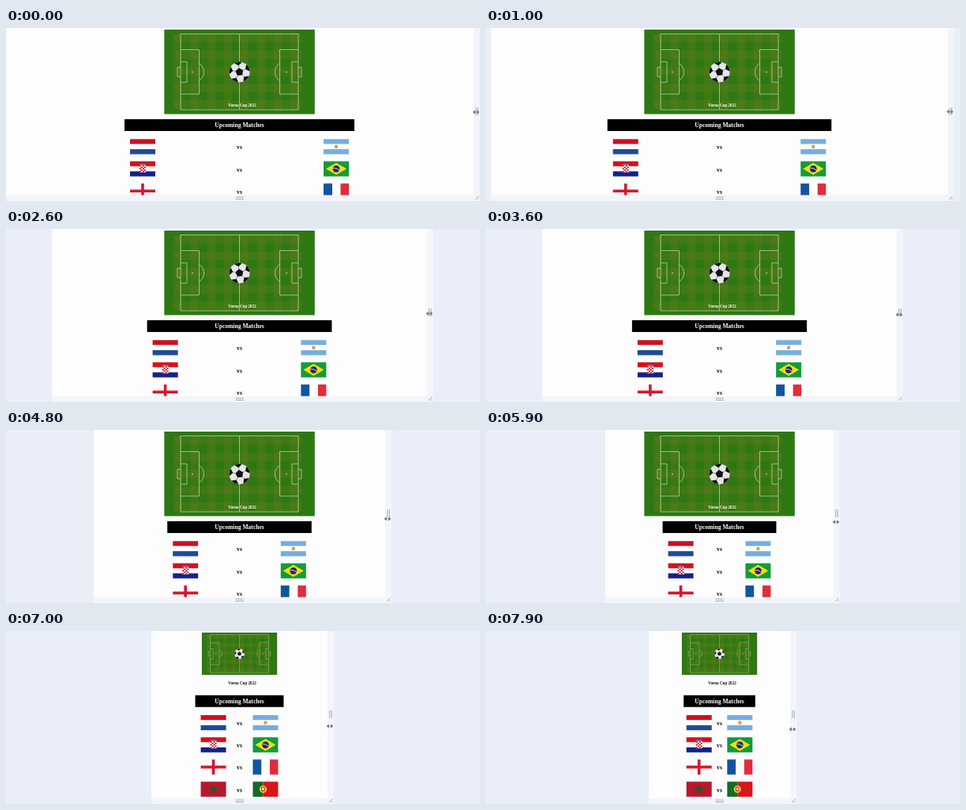
An HTML page that plays this animation: 600x220 px, repeating every 8 s.

```html
<!DOCTYPE html>
<html lang="en">
<head>
<meta charset="utf-8">
<title>Resizing a match page</title>
<style>
html, body { margin: 0; width: 100%; height: 100%; overflow: hidden; background: #e9eef8; }
svg { display: block; }
text { font: bold 7.6px "Liberation Serif", "Times New Roman", serif; text-anchor: middle; }
</style>
</head>
<body>
<svg id="stage" width="600" height="220" viewBox="0 0 600 220"></svg>
<script>
const MID = 295.5, LOOP = 8000, STEP = 100;

// [time, value] points joined by straight lines
const edgeKeys = [[0, -1], [900, 2], [1600, 35], [1800, 35], [2700, 61], [3600, 71], [4500, 98],
  [4800, 111], [5400, 135], [5900, 151], [6300, 159], [7000, 184], [7200, 188], [7900, 206]];
const pointerKeys = [[0, 107], [1600, 106], [3600, 109], [4800, 113], [5900, 117], [7000, 121], [7900, 125]];

function track(keys, t) {
  const i = keys.findIndex(k => k[0] > t);
  if (i < 0) return keys[keys.length - 1][1];
  const [t0, a] = keys[i - 1], [t1, b] = keys[i];
  return a + (b - a) * (t - t0) / (t1 - t0);
}

const rect = (x, y, w, h, fill, more = '') =>
  `<rect x="${x}" y="${y}" width="${w}" height="${h}" fill="${fill}" ${more}/>`;
const circle = (x, y, r, fill) => `<circle cx="${x}" cy="${y}" r="${r}" fill="${fill}"/>`;
const path = (d, fill, more = '') => `<path d="${d}" fill="${fill}" ${more}/>`;
const repeat = (n, f) => Array.from({ length: n }, (_, i) => f(i)).join('');
const bands = (...c) => c.map((f, i) => rect(0, i * 6.4, 32, 6.4, f)).join('');

// Star-like polygon; jump 1 gives a pentagon, jump 2 a star
function penta(x, y, r, jump = 1, turn = 0) {
  const pts = Array.from({ length: 5 }, (_, i) => {
    const a = (i * jump * 72 + turn - 90) * Math.PI / 180;
    return (x + r * Math.cos(a)).toFixed(2) + ' ' + (y + r * Math.sin(a)).toFixed(2);
  });
  return 'M' + pts.join('L') + 'Z';
}

const flags = {
  netherlands: bands('#cc1020', '#fff', '#1f4a96'),
  argentina: bands('#75aede', '#fff', '#75aede') + circle(16, 9.6, 2.3, '#d9a04c'),
  croatia: bands('#d5101c', '#fff', '#14208c') + rect(12, 5, 8, 9, '#fff') +
    repeat(20, i => (i + (i / 4 | 0)) % 2 ? '' :
      rect(12 + i % 4 * 2, 5 + (i / 4 | 0) * 1.8, 2, 1.8, '#d5101c')) +
    rect(12.5, 3.2, 7, 1.8, '#5a83b8'),
  brazil: rect(0, 0, 32, 19.2, '#129b3c') + path('M3 9.6L16 2L29 9.6L16 17.2Z', '#f8dc0c') +
    circle(16, 9.6, 4.4, '#1b2a75') + path('M11.9 8.6Q16.5 8 20 11.4', 'none', 'stroke="#fff" stroke-width=".8"'),
  england: rect(0, 0, 32, 19.2, '#fdfafa') + rect(14.2, 0, 3.6, 19.2, '#d2182e') + rect(0, 7.8, 32, 3.6, '#d2182e'),
  france: rect(0, 0, 11, 19.2, '#1254a0') + rect(11, 0, 10.5, 19.2, '#fff') + rect(21.5, 0, 10.5, 19.2, '#e12c3c'),
  morocco: rect(0, 0, 32, 19.2, '#b8182c') +
    path(penta(16, 10, 5, 2), 'none', 'stroke="#1a5a30" stroke-width="1.2"'),
  portugal: rect(0, 0, 13, 19.2, '#14692c') + rect(13, 0, 19, 19.2, '#d8141c') +
    circle(13, 9.6, 4.6, '#e6cf30') + rect(10.8, 6.6, 4.4, 5.6, '#d8141c') + rect(11.8, 7.6, 2.4, 3.4, '#fff')
};
const matches = [['netherlands', 'argentina'], ['croatia', 'brazil'], ['england', 'france'], ['morocco', 'portugal']];

// The pitch is drawn around its top centre
const halfPitch = path('M-74.5 27.5H-51V84H-74.5M-74.5 43H-66.500V69H-74.5M-74.5 50H-78.5V62H-74.5M-51 45A13 13 0 0 1 -51 67', 'none') +
  circle(-59.5, 56, .5, '#cfe0bc');
const ball = `<g transform="translate(0 56) rotate(-8)">` + circle(0, 0, 13, '#e6e6e6') +
  `<g clip-path="url(#round)">` +
  repeat(5, i => `<g transform="rotate(${i * 72})">` +
    path('M0 -5V-10', 'none', 'stroke="#777" stroke-width=".7"') + path(penta(0, -13, 4.6, 1, 180), '#111') + '</g>') +
  path(penta(0, 0, 5.2), '#111') + '</g></g>';
const pitch = rect(-95.2, 0, 190.5, 107.500, '#2d7813', 'transform="translate(0 2)"') +
  repeat(8, i => rect(-83 + i * 21, 8, 10.5, 96, '#7b7a1c', 'opacity=".22"')) +
  repeat(5, i => rect(-83, 8 + i * 21, 162, 10.5, '#7b7a1c', 'opacity=".22"')) +
  `<g stroke="#b9d3a2" stroke-width=".8">` + rect(-74.5, 7.5, 149, 96.5, 'none') + path('M0 7.5V104', 'none') +
  halfPitch + `<g transform="scale(-1 1)">${halfPitch}</g></g>` + ball;

const grip = (d, x, y) => `<g transform="translate(${x} ${y})">` +
  path(d, 'none', 'stroke="#a4a8ae" stroke-width="1"') + '</g>';

const stage = document.getElementById('stage');
stage.innerHTML = `<defs><clipPath id="round"><circle r="13"/></clipPath>
  <clipPath id="view"><rect width="600" height="212.5"/></clipPath></defs>
  <rect id="frame" height="220" fill="#f3f5fa"/>
  <rect id="page" height="212.5" fill="#fdfdfe"/>
  <g clip-path="url(#view)">
    <g id="pitch">${pitch}</g>
    <text id="title" x="299" style="font-size:5.1px">Vorna Cup 2022</text>
    <g id="list">
      <rect id="bar" y="116" height="15" fill="#000"/>
      <text x="${MID}" y="126" fill="#fff">Upcoming Matches</text>
      ${repeat(4, i => `<text x="${MID}" y="${154.3 + i * 28.2}" fill="#111">vs</text>`)}
      ${[0, 1].map(side => `<g id="side${side}">` + matches.map((m, i) =>
        `<g transform="translate(0 ${141.3 + i * 28.2})">${flags[m[side]]}</g>`).join('') + '</g>').join('')}
    </g>
  </g>
  ${grip('M-5 -1H5.500M-5 1.5H5.5', MID, 216)}
  <g id="grips">${grip('M-1.2 -5V5M1.3 -5V5', 0, 106) + grip('M-2 2.500L2.500 -2M1 2.5L2.5 1', 0, 215.500)}</g>
  <g id="pointer">${path('M-4 0L-1.500 -2V2ZM4 0L1.5 -2V2ZM-2 0H2', '#777', 'stroke="#777" stroke-width=".7"')}</g>`;

const $ = id => document.getElementById(id);
const set = (id, attrs) => { for (const k in attrs) $(id).setAttribute(k, attrs[k]); };
const move = (id, x, y) => set(id, { transform: `translate(${x} ${y})` });

function draw(now) {
  const t = Math.floor(now % LOOP / STEP) * STEP;
  const left = track(edgeKeys, t), width = 2 * (MID - left);
  const bar = .484 * width + 4, barLeft = MID - bar / 2;
  const flagLeft = Math.min(barLeft + 7, 253.7);
  const narrow = width < 285.6;

  set('frame', { x: left, width: width + 8 });
  set('page', { x: left, width });
  set('bar', { x: barLeft, width: bar });
  move('side0', flagLeft, 0);
  move('side1', 2 * MID - flagLeft - 32, 0);
  set('pitch', { transform: narrow ? `translate(${MID} 1) scale(.5)` : `translate(${MID} 0)` });
  set('title', { y: narrow ? 67.5 : 100, fill: narrow ? '#111' : '#fff' });
  move('list', 0, narrow ? -34.3 : 0);
  move('grips', left + width + 4, 0);
  move('pointer', left + width + 3, track(pointerKeys, t));
  requestAnimationFrame(() => draw(performance.now()));
}
draw(performance.now());
</script>
</body>
</html>
```
